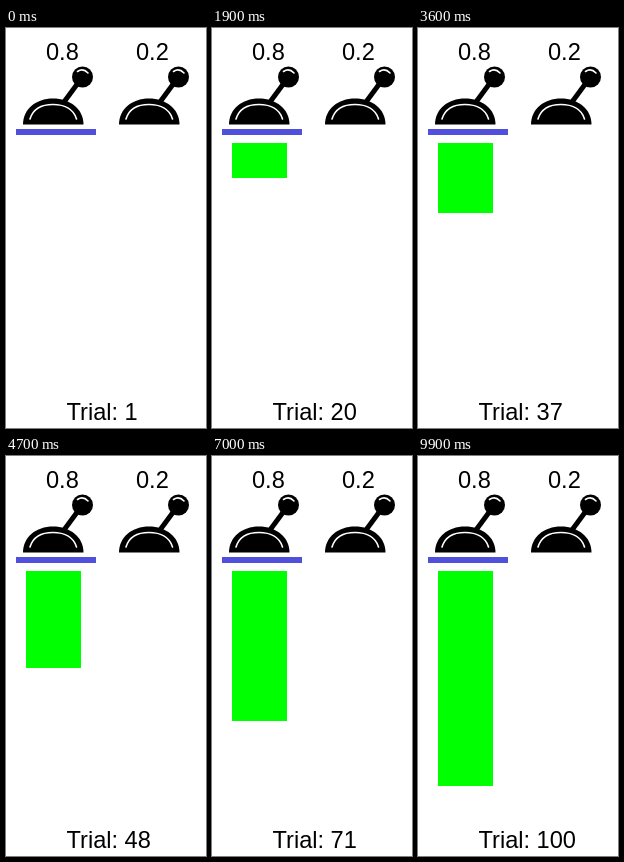
These frames come from a looping animation (200x400 px, 10 s). An HTML page:

```html
<!DOCTYPE html>
<html lang="en">
<head>
<meta charset="utf-8">
<title>Two-armed bandit</title>
<style>
  html, body { margin: 0; width: 100%; height: 100%; overflow: hidden; background: #fff; }
  svg { display: block; width: 200px; height: 400px; }
  text { font: 23.6px "Liberation Sans", Arial, sans-serif; fill: #000; }
</style>
</head>
<body>
<svg viewBox="0 0 200 400">
  <defs>
    <g id="lever">
      <path d="M58 74L72 55" stroke="#000" stroke-width="5"/>
      <circle cx="76.5" cy="49" r="10.5"/>
      <path d="M17 96.5C17 81 30 70.5 47 70.5S77.500 81 77.500 96.500Z"/>
      <g fill="none" stroke="#fff" stroke-width="1.6" stroke-linecap="round">
        <path d="M24 91C27 81 36 76.500 47 76.500S67.500 81 70.500 91"/>
        <path d="M71.500 43.500Q77 39.500 82 45"/>
      </g>
    </g>
  </defs>
  <text x="40" y="32">0.8</text>
  <text x="130" y="32">0.2</text>
  <use href="#lever"/>
  <use href="#lever" x="96"/>
  <rect x="10" y="101" width="80" height="6" fill="#5050dc"/>
  <rect id="bar" x="20" y="115" width="55" height="0" fill="#0f0"/>
  <text id="trial" x="60.5" y="391.8">Trial: 1</text>
</svg>
<script>
  const TRIALS = 100, TRIAL_MS = 100, REWARD_PX = 2.5;
  // Trials that pay nothing; every other one lengthens the bar.
  const misses = [1, 5, 9, 14, 16, 19, 27, 31, 36, 51, 64, 75, 82, 95];
  const bar = document.getElementById("bar");
  const label = document.getElementById("trial");
  const start = performance.now();

  function draw(ms) {
    const trial = Math.floor(ms / TRIAL_MS) % TRIALS + 1;
    const wins = trial - misses.filter(m => m <= trial).length;
    bar.setAttribute("height", Math.floor(wins * REWARD_PX));
    label.textContent = `Trial: ${trial}`;
  }

  function tick() {
    draw(performance.now() - start);
    requestAnimationFrame(tick);
  }
  tick();
</script>
</body>
</html>
```
